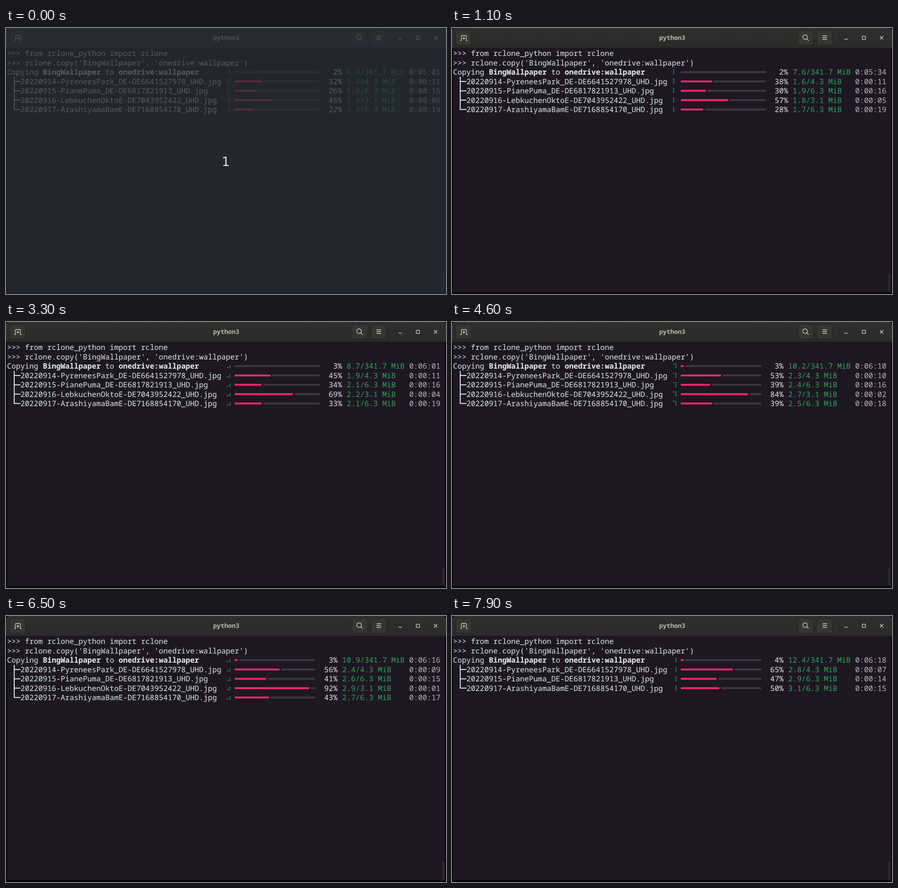
These frames come from a looping animation (962x582 px, 8000 ms). An HTML page:

```html
<!DOCTYPE html>
<html lang="en">
<head>
<meta charset="utf-8">
<title>python3</title>
<style>
  html, body { margin: 0; width: 100%; height: 100%; overflow: hidden; background: #000; }
  svg { display: block; width: 962px; height: 582px; }
  text { font: 16.28px "Noto Sans Mono", "DejaVu Sans Mono", monospace; fill: #d6ebee;
         white-space: pre; text-rendering: geometricPrecision; }
  .bold { font-weight: 700; fill: #e4eeee; }
  .size { fill: #2ea552; }
  .eta { fill: #bdb4b2; }
  .percent { fill: #e6e5e1; text-anchor: end; }
  .title { font-size: 13.6px; font-weight: 700; fill: #b9b8b3; text-anchor: middle; }
  .count { font: 28px "DejaVu Sans", sans-serif; fill: #e2e2df; text-anchor: middle; }
  .button { fill: #353532; stroke: #222220; }
  .icon { fill: none; stroke: #d3d2cd; stroke-width: 1.3; }
  .dots { stroke: #2ea552; stroke-width: 2.6; stroke-linecap: round; }
  .done { fill: #f92672; }
  .rest { fill: #3a3a3a; }
  .tree { fill: none; stroke: #d6ebee; stroke-width: 2; }
  .shade { visibility: hidden; animation: shade 8s step-end infinite; }
  @keyframes shade { 0% { visibility: visible; } 1.25%, 100% { visibility: hidden; } }
</style>
</head>
<body>
<svg viewBox="0 0 962 582">
  <defs>
    <linearGradient id="bar" x2="0" y2="1">
      <stop stop-color="#302f2d"/><stop offset="1" stop-color="#2a2a28"/>
    </linearGradient>
  </defs>
  <rect width="962" height="582"/>
  <path d="M0 44V8q0-8 8-8h946q8 0 8 8v36z" fill="url(#bar)"/>
  <rect x="2" y="43.5" width="958" height="535.5" fill="#1e1723"/>
  <rect x="953" y="537" width="6" height="39" rx="1" fill="#2b2530"/>

  <g class="button">
    <rect x="8.5" y="5.5" width="34" height="32" rx="5"/>
    <rect x="756.5" y="5.5" width="34" height="32" rx="5"/>
    <rect x="797.5" y="5.5" width="34" height="32" rx="5"/>
  </g>
  <g class="icon">
    <path d="M18 27.5h2.5V18q0-1.5 1.5-1.5h8q1.5 0 1.5 1.5v9.5H34M26 19.5v6M23 22.5h6"/>
    <circle cx="772" cy="20" r="5"/><path d="M775.7 23.7l4 4"/>
    <path d="M810 17h10M810 21h10M810 25h10"/>
    <path d="M858 24.5h7.5"/>
    <rect x="897" y="18" width="7" height="7"/>
    <path d="M935.7 17.7l7.3 7.3M943 17.7l-7.3 7.3"/>
  </g>
  <text class="title" x="481.5" y="26">python3</text>

  <text x="2.3" y="61.3">&gt;&gt;&gt; from rclone_python import rclone</text>
  <text x="2.3" y="81.7">&gt;&gt;&gt; rclone.copy('BingWallpaper', 'onedrive:wallpaper')</text>
  <text x="2.3" y="102.2">Copying <tspan class="bold">BingWallpaper</tspan> to <tspan class="bold">onedrive:wallpaper</tspan></text>
  <path id="tree" class="tree"/>
  <g id="rows"></g>
  <g class="shade">
    <rect width="962" height="582" fill="#262c34" fill-opacity=".76"/>
    <text class="count" x="480.5" y="302">1</text>
  </g>
</svg>
<script>
const LOOP = 8000, CELL = 9.768, LEFT = 2.3, TOP = 102.2, PITCH = 20.45;
const MIDDLE = -5.7;  // centre of a line, relative to its baseline
const SPINNER = '⠋⠙⠹⠸⠼⠴⠦⠧⠇⠏';

// Statistics arrive every 500 ms. All transfers share one pace: [tick, progress].
const PACE = [[-1, -.07], [0, 0], [4, .275], [6, .345], [9, .6], [12, .725], [15, 1]];

// from and to in percent, total in MiB, share of the whole bandwidth
const TASKS = [
  { name: '', total: 341.7, from: 1.99, to: 3.629, share: 1 },
  { name: '20220914-PyreneesPark_DE-DE6641527978_UHD.jpg', total: 4.3, from: 34, to: 65, share: .225 },
  { name: '20220915-PianePuma_DE-DE6817821913_UHD.jpg', total: 6.3, from: 27, to: 46.6, share: .268 },
  { name: '20220916-LebkuchenOktoE-DE7043952422_UHD.jpg', total: 3.14, from: 49, to: 108, share: .228 },
  { name: '20220917-ArashiyamaBamE-DE7168854170_UHD.jpg', total: 6.3, from: 24, to: 49.8, share: .23 },
];

const col = n => LEFT + n * CELL;
const baseline = line => TOP + line * PITCH;
const byId = id => document.getElementById(id);

function set(node, attrs) {
  for (const key in attrs) node.setAttribute(key, attrs[key]);
  return node;
}

function add(parent, tag, attrs) {
  const node = document.createElementNS('http://www.w3.org/2000/svg', tag);
  return parent.appendChild(set(node, attrs));
}

function paceAt(tick) {
  const i = Math.max(1, PACE.findIndex(([t]) => t >= tick));
  const [t0, p0] = PACE[i - 1], [t1, p1] = PACE[i];
  return p0 + (p1 - p0) * (tick - t0) / (t1 - t0);
}

// Average bandwidth in MiB/s, settling after a fast start.
const speedAt = tick => .86 + .2065 * Math.exp(-tick / 5);

function clock(seconds) {
  const pad = n => String(Math.floor(n)).padStart(2, '0');
  return `0:${pad(seconds / 60)}:${pad(seconds % 60)}`;
}

// The low six bits of a braille character are its dots, column by column.
function dotPath(char) {
  const bits = char.charCodeAt(0) & 63;
  let path = '';
  for (let d = 0; d < 6; d++) {
    if (bits >> d & 1) path += `M${d < 3 ? 484.7 : 489.5} ${-10.4 + d % 3 * 4}h.01`;
  }
  return path;
}

const rows = TASKS.map(task => {
  const group = add(byId('rows'), 'g', {});
  const bar = name => add(group, 'rect', { class: name, y: MIDDLE - 2, height: 4 });
  const label = (name, x) => add(group, 'text', { class: name, x });
  label('name', col(3)).textContent = task.name;
  return {
    task, group,
    dots: add(group, 'path', { class: 'dots' }),
    rest: bar('rest'), done: bar('done'),
    percent: label('percent', 0), size: label('size', 0), eta: label('eta', col(90)),
  };
});

// Bars advance in half cells, with a half-cell gap after the filled part.
function drawBar(row, share, cells) {
  const halves = Math.floor(cells * 2 * share);
  const odd = halves % 2, x = col(51) - .2, half = CELL / 2;
  const restX = halves ? x + (halves + 1) * half - (odd ? 0 : 1.2) : x;
  set(row.done, { x, width: halves * half + (odd ? 1.2 : 0) });
  set(row.rest, { x: restX, width: Math.max(0, x + cells * CELL - restX) });
}

function draw(time) {
  const now = Math.floor(time / 100) * 100 - 100;
  const tick = Math.floor(now / 500);
  const pace = paceAt(tick);
  const spin = dotPath(SPINNER[(6 + Math.floor(now / 80.3)) % SPINNER.length]);
  const shareOf = ({ from, to }) => (from + (to - from) * pace) / 100;
  const sizeOf = task => (shareOf(task) * task.total).toFixed(1);
  const extra = sizeOf(TASKS[0]).length - 3;  // a wider size column shortens the bars
  let line = 0, tree = '';

  for (const row of rows) {
    const { task } = row, share = shareOf(task);
    row.group.style.display = share < 1 ? '' : 'none';
    if (share >= 1) continue;
    const y = baseline(line);
    if (line++) tree += `M18 ${y + MIDDLE}H${col(3)}`;
    set(row.group, { transform: `translate(0 ${y})` });
    set(row.dots, { d: spin });
    drawBar(row, share, 19 - extra);
    set(row.percent, { x: col(75 - extra) }).textContent = Math.round(share * 100) + '%';
    set(row.size, { x: col(76 - extra) }).textContent = `${sizeOf(task)}/${task.total.toFixed(1)} MiB`;
    row.eta.textContent = clock((1 - share) * task.total / (speedAt(tick) * task.share));
  }
  set(byId('tree'), { d: `M18 107V${baseline(line - 1) + MIDDLE + 1}${tree}` });
}

const shade = document.querySelector('.shade').getAnimations()[0];
const start = performance.now();
function loop() {
  const time = (performance.now() - start) % LOOP;
  shade.currentTime = time;
  draw(time);
  requestAnimationFrame(loop);
}
loop();
</script>
</body>
</html>
```
